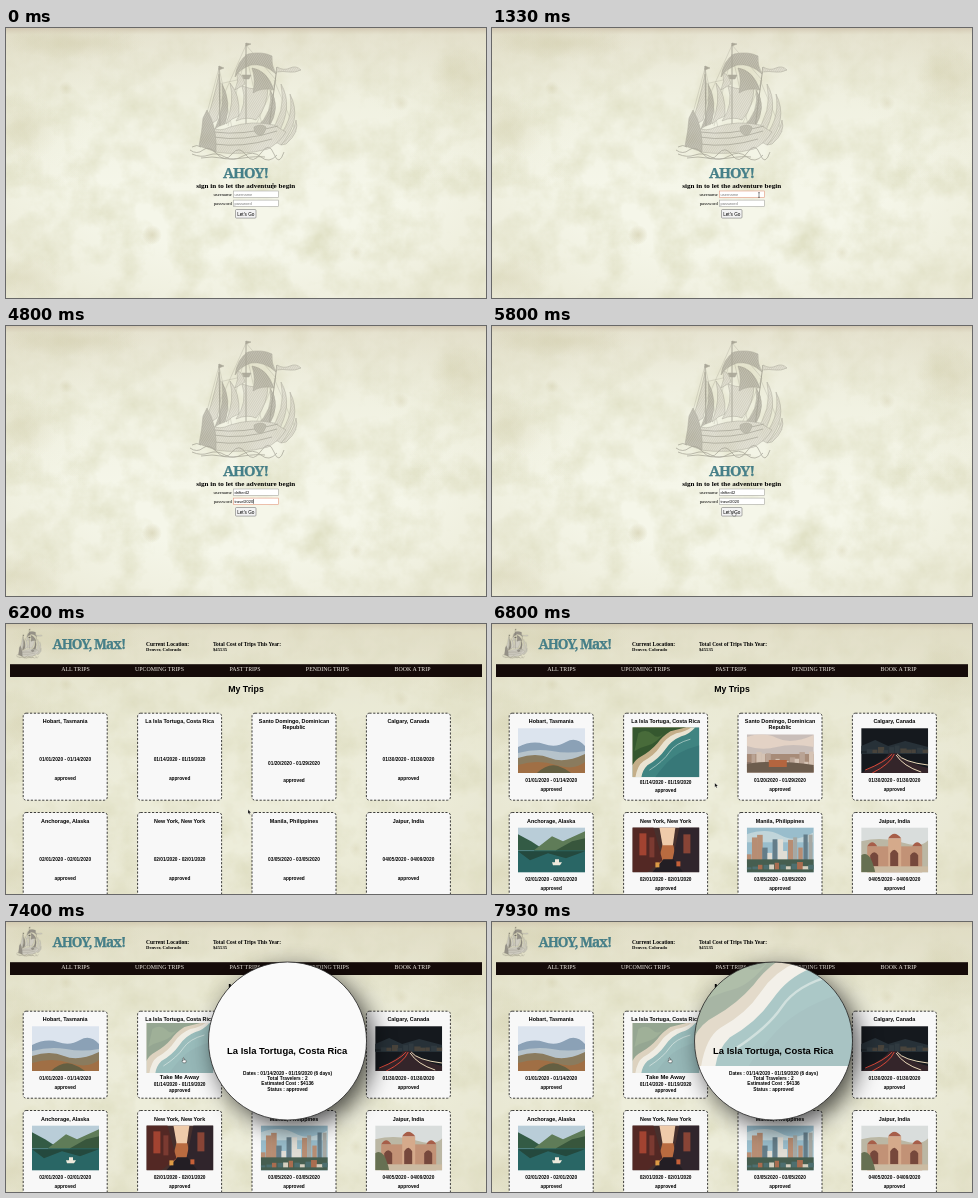
Write an HTML page that moves like this. It is 480 px wide and 270 px high and loops after 8 s.

```html
<!DOCTYPE html>
<html lang="en">
<head>
<meta charset="utf-8">
<title>Ahoy</title>
<style>
html, body { margin: 0; width: 100%; height: 100%; overflow: hidden; background: #f3f4e6; }
svg { position: absolute; left: 0; top: 0; width: 100%; height: 100%; display: block; }
.serif { font-family: "Liberation Serif", Times, serif; }
.sans { font-family: "Liberation Sans", Arial, sans-serif; }
.slab { font-family: "Noto Serif", serif; font-weight: 700; fill: #44808a; stroke: #44757c; stroke-width: .25; letter-spacing: -1px; }
.b { font-weight: 700; }
.mid { text-anchor: middle; }
text { white-space: pre; }
</style>
</head>
<body>
<svg viewBox="0 0 480 270">
  <defs>
    <linearGradient id="top" x2="0" y2="1">
      <stop offset="0" stop-color="#cdc0aa" stop-opacity=".8"/>
      <stop offset=".025" stop-color="#dcd6c0" stop-opacity=".5"/>
      <stop offset=".3" stop-color="#e4e3cc" stop-opacity=".25"/>
      <stop offset=".6" stop-color="#e4e3cc" stop-opacity="0"/>
    </linearGradient>
    <radialGradient id="edge" r=".75">
      <stop offset=".45" stop-color="#e0dec4" stop-opacity="0"/>
      <stop offset="1" stop-color="#dedabf" stop-opacity=".55"/>
    </radialGradient>
    <radialGradient id="stain">
      <stop offset="0" stop-color="#c9c39c" stop-opacity=".32"/>
      <stop offset="1" stop-color="#c9c39c" stop-opacity="0"/>
    </radialGradient>
    <filter id="mottle" x="0" y="0" width="1" height="1" color-interpolation-filters="sRGB">
      <feTurbulence type="fractalNoise" baseFrequency=".03" numOctaves="5" seed="8"/>
      <feColorMatrix values="0 0 0 0 .86  0 0 0 0 .86  0 0 0 0 .74  1.4 0 0 0 -.5"/>
    </filter>
  </defs>
  <rect width="480" height="270" fill="#f5f6e9"/>
  <rect width="480" height="270" filter="url(#mottle)"/>
  <rect width="480" height="270" fill="url(#edge)"/>
  <rect width="480" height="270" fill="url(#top)"/>
  <g fill="url(#stain)">
    <ellipse cx="15" cy="100" rx="40" ry="35"/><ellipse cx="70" cy="15" rx="70" ry="16"/>
    <ellipse cx="460" cy="50" rx="35" ry="30"/><ellipse cx="20" cy="250" rx="40" ry="25"/>
    <circle cx="146" cy="207" r="10"/><circle cx="146" cy="207" r="10"/>
    <circle cx="60" cy="60" r="7"/><circle cx="350" cy="225" r="7"/><circle cx="395" cy="75" r="8"/>
  </g>
</svg>
<svg id="stage" viewBox="0 0 480 270"></svg>
<script>
const LOOP = 8000;
const USER = "drifter42", PASS = "travel2020", NAME = "Max";
const USER_KEYS = [1470, 1530, 1670, 1730, 1870, 2000, 2070, 2200, 2930];
const PASS_KEYS = [3470, 3670, 3730, 3870, 4000, 4200, 4470, 4470, 4670, 4800];
const FOCUS_USER = 530, FOCUS_PASS = 3200, CLICK = 5670, PAGE = 6200;
const PHOTOS = 6670, HOVER = 6870, MODAL = 7270, FADE = 7470;

const text = (x, y, size, cls, str, more = "") =>
  `<text x="${x}" y="${y}" font-size="${size}" class="${cls}" ${more}>${str}</text>`;
const path = (d, fill, more = "") => `<path d="${d}" fill="${fill}" ${more}/>`;
const rect = (x, y, w, h, fill, more = "") =>
  `<rect x="${x}" y="${y}" width="${w}" height="${h}" fill="${fill}" ${more}/>`;

function random(seed) {
  return () => (seed = (seed * 16807) % 2147483647) / 2147483647;
}

// Row of buildings standing on a base line
function skyline(seed, n, base, low, high, colors) {
  const rnd = random(seed), w = 67 / n;
  let out = "";
  for (let i = 0; i < n; i++) {
    const h = low + rnd() * (high - low);
    out += rect(i * w, base - h, w * (.75 + rnd() * .4), h, colors[Math.floor(rnd() * colors.length)]);
  }
  return out;
}

const ship = `
  <g stroke="#6a665c" stroke-width=".5" stroke-linejoin="round">
    <path d="M240 17L204 98M240 26L222 98M240 26L256 97M240 17L270 52M213 40L197 100M213 40L226 100M270 52L250 97M268 52L290 104M240 50L213 56" fill="none" stroke-width=".35"/>
    <path d="M213 46Q218 70 211 92Q203 98 198 100Q207 76 213 46Z" fill="url(#hatch)"/>
    <path d="M216 56Q226 74 219 96Q212 98 209 101Q219 78 216 56Z" fill="url(#dark)"/>
    <path d="M224 55Q234 66 233 88Q226 90 220 96Q229 74 224 55Z" fill="url(#hatch)"/>
    <path d="M236 58Q252 64 262 58Q262 78 250 92Q241 88 230 93Q242 76 236 58Z" fill="url(#hatch)"/>
    <path d="M264 62Q276 78 262 101Q256 98 250 100Q268 84 264 62Z" fill="url(#dark)"/>
    <path d="M275 56Q288 78 271 108Q267 106 262 107Q281 84 275 56Z" fill="url(#hatch)"/>
    <path d="M284 66Q297 92 275 117Q272 114 267 115Q289 94 284 66Z" fill="url(#hatch)"/>
    <path d="M290 92Q294 104 280 116L275 117Q288 106 290 92Z" fill="url(#hatch)"/>
    <path d="M229 49Q231 33 242 26Q256 23 266 28Q265 37 270 46Q258 35 245 37Q235 40 229 49Z" fill="url(#dark)"/>
    <path d="M246 40Q261 42 268 62Q256 59 247 65Q250 52 246 40Z" fill="url(#dark)"/>
    <path d="M231 45Q237 46 239 56L229 62Q233 53 231 45Z" fill="url(#hatch)"/>
    <path d="M236 47h9l-2 4h-5z" fill="#777266"/>
    <path d="M240 15V96M213 38L214 98M271 39L263 100" fill="none" stroke-width="1"/>
    <path d="M240 15l5 1-5 2zM213 38l5 2-5 2z" fill="#6d685b"/>
    <path d="M271 39q7 4 13 1t11 2q-6 3-12 2t-13 0z" fill="url(#hatch)"/>
    <path d="M206 100Q214 104 224 99Q246 92 268 97L280 104Q274 114 262 121Q236 128 208 124Q202 112 206 100Z" fill="url(#hatch)"/>
    <path d="M207 109Q238 114 271 103M208 116Q236 120 266 111M208 104Q236 108 272 98" fill="none" stroke-width=".8"/>
    <path d="M248 99q7-4 12 0q-1 8-6 8q-6 0-6-8z" fill="url(#dark)"/>
    <path d="M193 118Q196 104 197 90L201 82L205 90Q211 105 210 124Z" fill="url(#dark)"/>
    <path d="M184 122q7 5 13 0t14 4t15 0t14 1t15-2t13 1t10-2M186 126q9 4 17 1t16 2t18-1t18 1t16-2M186 119q5-3 9 0M195 130q12-2 20 0t22 0t22-1" fill="none" stroke-width=".8"/>
  </g>`;

const land =
  rect(0, 0, 67, 50, "#3f8481") +
  path("M0 0H63Q57 7 49 9Q39 13 33 22Q26 32 15 38Q10 43 9 50H0Z", "#e9e3d2") +
  path("M0 0H59Q54 4 44 6Q34 10 28 19Q22 28 11 34Q5 38 3 50H0Z", "#c4ae88") +
  path("M0 0H54Q46 2 38 4Q30 9 25 16Q18 24 9 29Q3 32 0 38Z", "#35572f") +
  path("M6 6q8-5 14 1t12-2q-8 11-16 13t-14 6z", "#486b3a") +
  path("M67 18Q45 24 35 35T23 50H67Z", "#337074", 'opacity=".6"') +
  path("M58 12Q43 16 37 25T17 43", "none", 'stroke="#d5e5de" stroke-width="1" opacity=".6"');

const photos = [
  rect(0, 0, 67, 50, "#dce4ee") +
    path("M0 19Q14 12 26 16T48 14T67 18V50H0Z", "#8ba1b6") +
    path("M0 25Q18 20 34 23T67 23V50H0Z", "#b6c3cb") +
    path("M0 30Q18 24 32 30T67 26V50H0Z", "#8a7b5e") +
    path("M0 37Q20 31 38 37T67 34V50H0Z", "#a06f45") +
    path("M14 50Q28 34 40 38T58 50Z", "#645f42"),
  land,
  rect(0, 0, 67, 50, "#c9beb9") +
    path("M0 6Q16 0 30 7T67 4V16Q45 12 30 16T0 15Z", "#e3d2c5") +
    path("M0 23H67V50H0Z", "#a78b78") +
    skyline(19, 14, 36, 5, 16, ["#b9a394", "#8c7569", "#d5c3b4"]) +
    path("M0 33Q25 28 67 34V50H0Z", "#6d5d4e") + rect(22, 29, 18, 7, "#b4653f"),
  rect(0, 0, 67, 50, "#15191e") +
    path("M0 18L14 12 27 18 44 13 67 19V26H0Z", "#273138") +
    skyline(5, 12, 25, 2, 8, ["#303a40", "#49443c", "#20282d"]) +
    path("M0 45Q26 31 28 25H36Q43 34 67 40V45Z", "#34252a") +
    path("M4 42Q24 34 31 26M11 45Q29 36 33 26", "none", 'stroke="#d94739" stroke-width="1"') +
    path("M36 26Q42 34 67 37M35 27Q42 38 60 44", "none", 'stroke="#e9d8b8" stroke-width="1"'),
  rect(0, 0, 67, 50, "#b9cdd8") +
    path("M0 7L13 14 27 23H0Z", "#335b45") +
    path("M16 23L34 9 45 14 67 4V27H16Z", "#5f7c58") +
    path("M38 23L54 14 67 11V27H38Z", "#38563c") +
    rect(0, 23, 67, 27, "#296665") +
    path("M0 24H67L48 31 30 26 12 33Z", "#24493e") +
    path("M34 35h10l-2 3h-7zM37 32h4v3h-4z", "#eee9dc"),
  rect(0, 0, 67, 50, "#47302d") +
    path("M27 0H43L39 29H32Z", "#efcbaa") + path("M30 18H41L46 45H23Z", "#b96b40") +
    path("M0 0H21L30 33 15 45H0Z", "#532824") + path("M67 0H47L40 33 51 45H67Z", "#30252c") +
    rect(7, 6, 7, 22, "#a24331") + rect(17, 10, 5, 20, "#7b3a31") +
    rect(51, 7, 7, 19, "#884436") + path("M20 45L31 32H41L51 45Z", "#231e24") +
    rect(23, 35, 4, 5, "#dc9b45") + rect(44, 34, 4, 5, "#c66038"),
  rect(0, 0, 67, 50, "#99bdcc") +
    path("M0 7Q20 0 34 8T67 5V15H0Z", "#c1d5da") +
    skyline(41, 13, 36, 9, 30, ["#e0ddd5", "#647d89", "#a6a8a3", "#b78d73"]) +
    rect(0, 32, 67, 18, "#465e50") +
    skyline(9, 12, 42, 2, 8, ["#a96d50", "#d4cfc0", "#4d6f70"]),
  rect(0, 0, 67, 50, "#d9dddc") +
    path("M0 14Q20 9 40 15T67 13V50H0Z", "#bbb7a4") +
    rect(6, 19, 55, 27, "#c29276") + rect(27, 11, 13, 30, "#d5aa8b") +
    path("M27 11Q33 2 40 11ZM6 19Q11 11 16 19ZM51 19Q56 11 61 19Z", "#a75e49") +
    path("M9 39V28q4-6 8 0v11zM29 39V26q4-7 8 0v13zM49 39V28q4-6 8 0v11z", "#76483c") +
    rect(0, 39, 67, 6, "#cbbba2") + path("M0 28Q9 22 14 45H0Z", "#667052")
];

const trips = [
  ["Hobart, Tasmania", "01/01/2020 - 01/14/2020"],
  ["La Isla Tortuga, Costa Rica", "01/14/2020 - 01/19/2020"],
  ["Santo Domingo, Dominican|Republic", "01/20/2020 - 01/29/2020"],
  ["Calgary, Canada", "01/30/2020 - 01/30/2020"],
  ["Anchorage, Alaska", "02/01/2020 - 02/01/2020"],
  ["New York, New York", "02/01/2020 - 02/01/2020"],
  ["Manila, Philippines", "03/05/2020 - 03/05/2020"],
  ["Jaipur, India", "04/05/2020 - 04/09/2020"]
];

function photo(i, x, y, h, id = "") {
  return `<svg ${id} x="${x}" y="${y}" width="67" height="${h}" style="width:67px;height:${h}px" viewBox="0 0 67 ${i === 1 ? 50 : 45}" preserveAspectRatio="xMidYMid slice">${photos[i]}</svg>`;
}

function card([title, dates], i) {
  const lines = title.split("|"), two = lines.length > 1, tall = i === 1;
  const foot = (a, b) => text(42, a, 4.75, "sans b mid", dates) + text(42, b, 4.75, "sans b mid", "approved");
  const bare = two ? foot(51.5, 69) : foot(48, 67.3);
  const full = photo(i, 8.8, two ? 21.3 : tall ? 14 : 15, two ? 38 : tall ? 50 : 44.7) +
    (tall ? foot(70.5, 78.5) : foot(68.4, 77.4));
  const hover = tall ? `<g class="hover">${photo(i, 8.8, 11.8, 50, 'id="pale"')}` +
    text(42, 68, 5.9, "sans b mid", "Take Me Away") + foot(74.5, 80.6) + "</g>" : "";
  return `<g transform="translate(${17.2 + (i % 4) * 114.4} ${89.2 + (i > 3 ? 99.3 : 0)})">` +
    rect(0, 0, 84, 87, "#f8f8f8", 'rx="3" stroke="#111" stroke-width=".8" stroke-dasharray="2.2 1.6"') +
    lines.map((s, k) => text(42, 10 + k * 6.2, 5.4, "sans b mid", s)).join("") +
    `<g class="bare">${bare}</g><g class="full${tall ? " rest" : ""}">${full}</g>${hover}</g>`;
}

const field = (id, label, y) =>
  text(225.8, y + 4.6, 4.8, "serif", label, 'text-anchor="end"') +
  rect(227.3, y, 45, 6.3, "#fff", `id="${id}Box" stroke-width=".6"`) +
  text(228.5, y + 4.6, 4, "sans", "", `id="${id}"`) +
  rect(0, y + 1, .5, 4.6, "#000", `id="${id}Caret"`);

const login = `<g id="login">
  <g opacity=".5">${ship}</g>
  ${text(239.5, 150.2, 14.7, "slab mid", "AHOY!")}
  ${text(239.7, 159.6, 7.1, "serif b mid", "sign in to let the adventure begin")}
  ${field("user", "username", 163)}${field("pass", "password", 172.1)}
  ${rect(229.5, 181.5, 20.5, 8.6, "#f3f3f3", 'id="go" rx="1" stroke="#777" stroke-width=".6"')}
  ${text(239.8, 187.5, 4.7, "sans mid", "Let's Go")}
</g>`;

const menu = [["ALL TRIPS", 69.5], ["UPCOMING TRIPS", 153.5], ["PAST TRIPS", 239], ["PENDING TRIPS", 321.5], ["BOOK A TRIP", 406.5]];
const info = ["Dates : 01/14/2020 - 01/19/2020 (6 days)", "Total Travelers : 2", "Estimated Cost : $4136", "Status : approved"];

const home = `<g id="home">
  ${rect(0, 0, 480, 270, "#d6d2b5", 'opacity=".28"')}
  <g transform="translate(-33 1.2) scale(.235 .25)">${ship}</g>
  ${text(46.5, 25.3, 13.6, "slab", `AHOY, ${NAME}!`)}
  ${text(140, 21.5, 5.5, "serif b", "Current Location:")}
  ${text(140, 27, 4.7, "serif b", "Denver, Colorado")}
  ${text(207, 21.5, 5.4, "serif b", "Total Cost of Trips This Year:")}
  ${text(207, 27, 4.7, "serif b", "$45535")}
  ${rect(4, 40.2, 472, 12.8, "#150b09")}
  ${menu.map(([s, x]) => text(x, 47.2, 5.9, "serif mid", s, 'fill="#f2eee6"')).join("")}
  ${text(240, 67.6, 8.75, "sans b mid", "My Trips")}
  ${trips.map(card).join("")}
  <g id="modal">
    <circle cx="288" cy="126" r="79" fill="#000" opacity=".7" filter="url(#blur)"/>
    <circle cx="281.5" cy="119" r="79" fill="#fafafa"/>
    <g clip-path="url(#disc)"><g id="hero" transform="translate(202 25) scale(2.38)">${land}</g></g>
    <circle cx="281.5" cy="119" r="79" fill="none" stroke="#222" stroke-width=".8"/>
    ${text(281.2, 131.8, 9.43, "sans b mid", "La Isla Tortuga, Costa Rica")}
    ${info.map((s, k) => text(281.5, 152.6 + k * 5.3, 4.8, "sans b mid", s)).join("")}
  </g>
</g>`;

const hatch = (id, fill, line, width) =>
  `<pattern id="${id}" width="3" height="1.8" patternUnits="userSpaceOnUse" patternTransform="rotate(-58)">
    <rect width="3" height="1.8" fill="${fill}"/><path d="M0 .6H3" stroke="${line}" stroke-width="${width}"/>
  </pattern>`;

const stage = document.getElementById("stage");
stage.innerHTML = `<defs>
  ${hatch("hatch", "#dedbd0", "#8d887c", .5)}${hatch("dark", "#a5a196", "#6f6a60", .8)}
  <filter id="blur" x="-.4" y="-.4" width="1.8" height="1.8"><feGaussianBlur stdDeviation="12"/></filter>
  <clipPath id="disc"><circle cx="281.5" cy="119" r="79"/></clipPath>
</defs>${login}${home}
<g id="pointer">
  <path id="beam" d="M-1-2.5Q0-2.5 0-1.8Q0-2.5 1-2.5M0-1.8V1.8M-1 2.5Q0 2.5 0 1.8Q0 2.5 1 2.5" fill="none" stroke="#222" stroke-width=".5"/>
  <path id="arrow" d="M0 0V4.4L1 3.5 1.7 5 2.4 4.7 1.7 3.2H3.1Z" fill="#000" stroke="#fff" stroke-width=".3"/>
  <path id="hand" d="M-.4 0Q0-.6 .5 0V1.8L2.3 2.2Q2.8 2.4 2.7 3L2.2 4.8H-.3L-1.7 3Q-1.6 2.2-.4 2.9Z" fill="#fff" stroke="#111" stroke-width=".4"/>
</g>`;

const $ = id => document.getElementById(id);
const show = (el, on) => el.setAttribute("visibility", on ? "inherit" : "hidden");
const showAll = (cls, on) => stage.querySelectorAll("." + cls).forEach(el => show(el, on));
const clamp = v => Math.max(0, Math.min(1, v));

// time, x, y, shape until the next stop
const stops = [
  [0, 267, 158, "beam"], [70, 267, 158, "beam"], [270, 262, 166.5, "beam"],
  [1000, 262, 166.5, "beam"], [1330, 267, 167, "beam"], [1470, 267, 167, ""],
  [5200, 267, 169, "beam"], [5330, 259, 177, "arrow"], [5470, 244, 184, "hand"],
  [5530, 241, 185, "hand"], [PAGE, 242, 185.5, "arrow"], [6530, 238, 181, "arrow"],
  [PHOTOS, 238, 181, "arrow"], [6800, 223, 159, "arrow"], [6950, 196, 146, "hand"],
  [7130, 177.5, 136, "hand"], [LOOP, 177.5, 136, "hand"]
];

function movePointer(t) {
  let i = 0;
  while (i < stops.length - 2 && t >= stops[i + 1][0]) i++;
  const [t0, x0, y0, shape] = stops[i], [t1, x1, y1] = stops[i + 1];
  const p = (t - t0) / (t1 - t0);
  $("pointer").setAttribute("transform", `translate(${x0 + (x1 - x0) * p} ${y0 + (y1 - y0) * p})`);
  for (const id of ["beam", "arrow", "hand"]) show($(id), id === shape);
}

function fill(id, str, hint, keys, start, end, t) {
  const n = keys.filter(k => t >= k).length, el = $(id), active = t >= start && t < end;
  el.textContent = n ? str.slice(0, n) : hint;
  el.setAttribute("fill", n ? "#000" : "#777");
  $(id + "Box").setAttribute("stroke", active ? "#e59a80" : "#a9a9a4");
  const last = n ? keys[n - 1] : start;
  $(id + "Caret").setAttribute("x", 228.5 + (n ? el.getComputedTextLength() : 0));
  show($(id + "Caret"), active && (t - last) % 1000 < 500);
}

function render(t) {
  const inside = t >= PAGE;
  show($("login"), !inside);
  show($("home"), inside);
  if (!inside) {
    fill("user", USER, "username", USER_KEYS, FOCUS_USER, FOCUS_PASS, t);
    fill("pass", PASS, "password", PASS_KEYS, FOCUS_PASS, CLICK, t);
    $("go").setAttribute("fill", t >= CLICK && t < 5800 ? "#dcdcdc" : "#f3f3f3");
  }
  showAll("bare", t < PHOTOS);
  showAll("full", t >= PHOTOS);
  showAll("rest", t >= PHOTOS && t < HOVER);
  showAll("hover", t >= HOVER);
  $("pale").setAttribute("opacity", 1 - .5 * clamp((t - HOVER) / 200));
  show($("modal"), t >= MODAL);
  $("hero").setAttribute("opacity", .42 * clamp((t - FADE) / 430));
  movePointer(t);
}

function frame(now) {
  render(now % LOOP);
  requestAnimationFrame(frame);
}
render(0);
requestAnimationFrame(frame);
</script>
</body>
</html>
```
